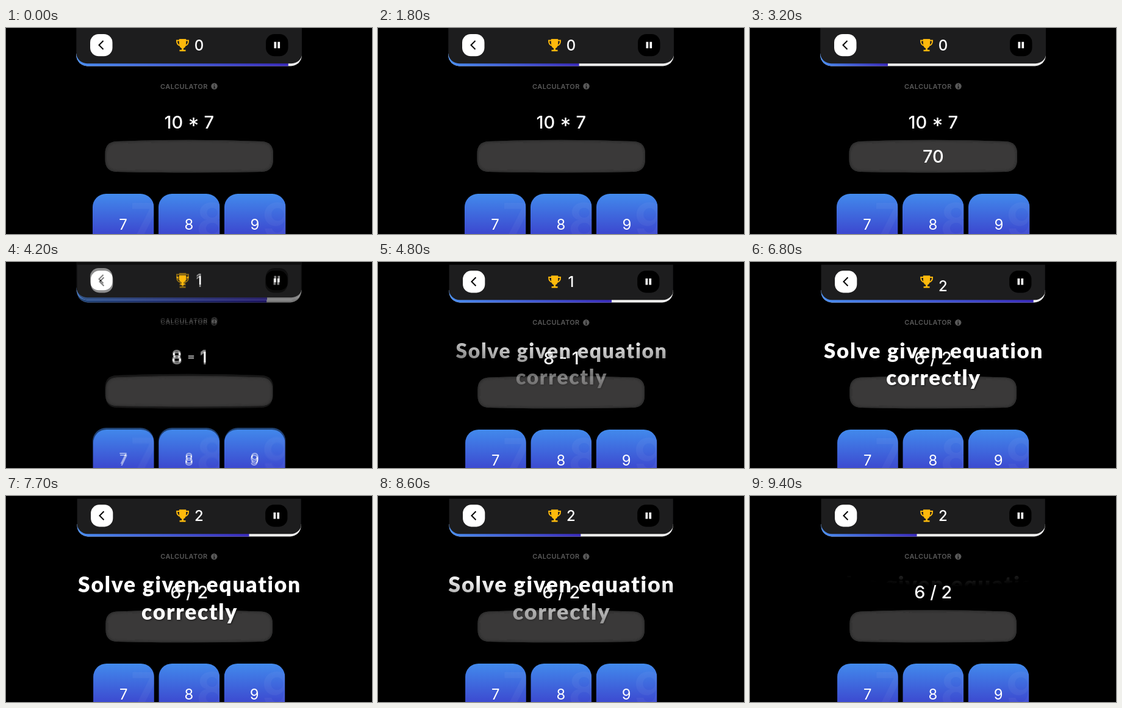
Animation, 600 px wide and 338 px high, one loop 9.5 s. Source, as an HTML page:

```html
<!DOCTYPE html>
<html lang="en">
<head>
<meta charset="utf-8">
<title>Calculator round</title>
<style>
  html, body { margin: 0; width: 100%; height: 100%; overflow: hidden; background: #000; }
  svg { display: block; width: 600px; height: 338px; }
  text { font-family: Inter, "Liberation Sans", sans-serif; fill: #fff; white-space: pre; }
  .mid { text-anchor: middle; }
  .score { font-size: 24px; font-weight: 500; }
  .big { font-size: 29px; font-weight: 500; }
  .label { font-size: 11px; font-weight: 600; letter-spacing: .4px; fill: #595959; }
  .key { font-size: 24px; }
  .ghost { font-size: 80px; font-weight: 700; fill-opacity: .045; }
  .title { font-family: Lato, "Open Sans", sans-serif; font-size: 34px; font-weight: 900; letter-spacing: 1.7px; }
  #title { filter: drop-shadow(1px 1.5px 1.5px rgba(0, 0, 0, .6)); }
</style>
</head>
<body>
<svg viewBox="0 0 600 338">
  <defs>
    <linearGradient id="barFill">
      <stop offset="0" stop-color="#4a8df0"/><stop offset="1" stop-color="#3a2bbd"/>
    </linearGradient>
    <linearGradient id="keyFill" x2="0" y2="1">
      <stop offset="0" stop-color="#428aec"/><stop offset="1" stop-color="#3926c0"/>
    </linearGradient>
    <radialGradient id="wipe" gradientUnits="userSpaceOnUse" cx="330" cy="0" r="1000">
      <stop offset=".89" stop-color="#fff"/><stop offset="1" stop-color="#000"/>
    </radialGradient>
    <filter id="soft"><feGaussianBlur stdDeviation="1.6"/></filter>
    <clipPath id="barClip"><rect x="115.3" y="-40" width="369.7" height="102.4" rx="18"/></clipPath>
    <clipPath id="keyClip"><rect y="272" width="100.5" height="100" rx="22"/></clipPath>
    <path id="box" d="M162.5 206Q162.5 187 181 186Q300 181.5 419 186Q438 187 438 206V216Q438 235 419 236Q300 238.5 181 236Q162.5 235 162.5 216Z"/>
    <clipPath id="boxClip"><use href="#box"/></clipPath>
    <clipPath id="stage"><rect width="600" height="400"/></clipPath>
    <mask id="wipeMask" maskUnits="userSpaceOnUse" x="0" y="0" width="600" height="338">
      <rect width="600" height="338" fill="url(#wipe)"/>
    </mask>

    <g id="app">
      <rect x="-20" y="-20" width="640" height="420"/>
      <g clip-path="url(#stage)">
        <g clip-path="url(#barClip)">
          <rect x="115" y="42" width="371" height="21" fill="#eee"/>
          <rect id="bar" x="115" y="42" width="1" height="21" fill="url(#barFill)"/>
          <rect x="115" y="-40" width="371" height="98.2" rx="18" fill="#1d1d1e"/>
        </g>
        <rect x="138" y="10" width="36.5" height="36.3" rx="14" fill="#fff"/>
        <path d="M159.5 21L152.5 28L159.5 35" fill="none" stroke="#000" stroke-width="2"/>
        <rect x="426" y="10" width="36.5" height="36.3" rx="14"/>
        <path d="M439.5 22.7h3.7v10.6h-3.7zM445.4 22.7h3.7v10.6h-3.7z" fill="#fff"/>
        <g fill="#fdb90c">
          <path d="M283.8 18H295.2V25Q295 32 291 33.2V35.8H294.5V38.3H284.5V35.8H288V33.2Q284 32 283.8 25Z"/>
          <path d="M284 20.6H280Q279.8 28.3 286 28.8M295 20.6H299Q299.2 28.3 293 28.8" fill="none" stroke="#fdb90c" stroke-width="2"/>
        </g>
        <text id="oldScore" class="score mid" x="316.5"></text>
        <text id="newScore" class="score mid" x="316.5"></text>
        <text class="label" x="253" y="99.5">CALCULATOR</text>
        <circle cx="341.5" cy="95.5" r="5.2" fill="#595959"/>
        <path d="M341.5 92.2v1.5M340.5 95.2h1.2v3M340.3 98.2h2.6" fill="none" stroke="#000" stroke-width="1"/>
        <text id="sum" class="big mid" x="300.3" y="164.5"></text>
        <use href="#box" fill="#3a3939"/>
        <g clip-path="url(#boxClip)">
          <use href="#box" fill="none" stroke="#2a2a2a" stroke-width="4" filter="url(#soft)"/>
        </g>
        <text id="answer" class="big mid" x="300.3" y="221"></text>
        <g id="keys"></g>
      </g>
    </g>
  </defs>

  <use href="#app"/>
  <use id="zoomed" href="#app" transform="translate(2 4.4) scale(.9933 .9945)"/>
  <g mask="url(#wipeMask)">
    <g id="title">
      <text class="title mid" x="301" y="158">Solve given equation</text>
      <text class="title mid" x="301" y="201">correctly</text>
    </g>
  </g>
</svg>
<script>
  const LOOP = 9500, STEP = 100, ROUND = 5000;
  const rounds = [
    { at: -300, sum: '10 * 7', keys: [[2600, '7'], [3000, '70']] },
    { at: 3430, sum: '8 - 1', keys: [[6200, '7']] },
    { at: 6540, sum: '6 / 2', keys: [] }
  ];
  const $ = id => document.getElementById(id);
  const set = (id, attrs) => {
    for (const k in attrs) $(id).setAttribute(k, attrs[k]);
  };
  const ramp = (t, a, b) => Math.min(1, Math.max(0, (t - a) / (b - a)));

  $('keys').innerHTML = [7, 8, 9].map((n, i) => `
    <g transform="translate(${142 + 108 * i} 0)" clip-path="url(#keyClip)">
      <rect y="272" width="100.5" height="100" fill="url(#keyFill)"/>
      <text class="ghost" x="62" y="345">${n}</text>
      <text class="key mid" x="50" y="331.3">${n}</text>
    </g>`).join('');

  function drawScore(n, age) {
    const p = n ? ramp(age, 0, 500) : 1;
    $('newScore').textContent = n;
    set('newScore', { y: 37.2 + 30 * (1 - p) ** 2, opacity: Math.min(1, p * 2) });
    $('oldScore').textContent = n ? n - 1 : '';
    set('oldScore', { y: 37.2 - 24 * p, opacity: Math.max(0, 1 - p * 2) });
  }

  function drawTitle(t) {
    const s = 1 + (t - 5500) * 1.84e-5;
    set('title', { transform: `translate(300.5 163) scale(${s}) translate(-300.5 -163)` });
    const edge = t < 7000
      ? 130 + 210 * ramp(t, 4300, 5300)
      : 330 - 195 * ramp(t, 8100, 9500);
    set('wipe', { cy: edge - 1000 });
    $('title').style.visibility = t < 4300 ? 'hidden' : 'visible';
  }

  function draw(t) {
    const n = rounds.filter(r => r.at <= t).length - 1;
    const { at, sum, keys } = rounds[n];
    const typed = keys.filter(k => k[0] <= t).pop();
    $('sum').textContent = sum;
    $('answer').textContent = typed ? typed[1] : '';
    set('bar', { width: 370 * (1 - (t - at) / ROUND) });
    set('zoomed', { opacity: ramp(t, 4100, 4300) });
    drawScore(n, t - at);
    drawTitle(t);
  }

  const start = performance.now();
  function tick() {
    const t = (performance.now() - start) % LOOP;
    draw(Math.floor(t / STEP) * STEP);
    requestAnimationFrame(tick);
  }
  tick();
</script>
</body>
</html>
```
